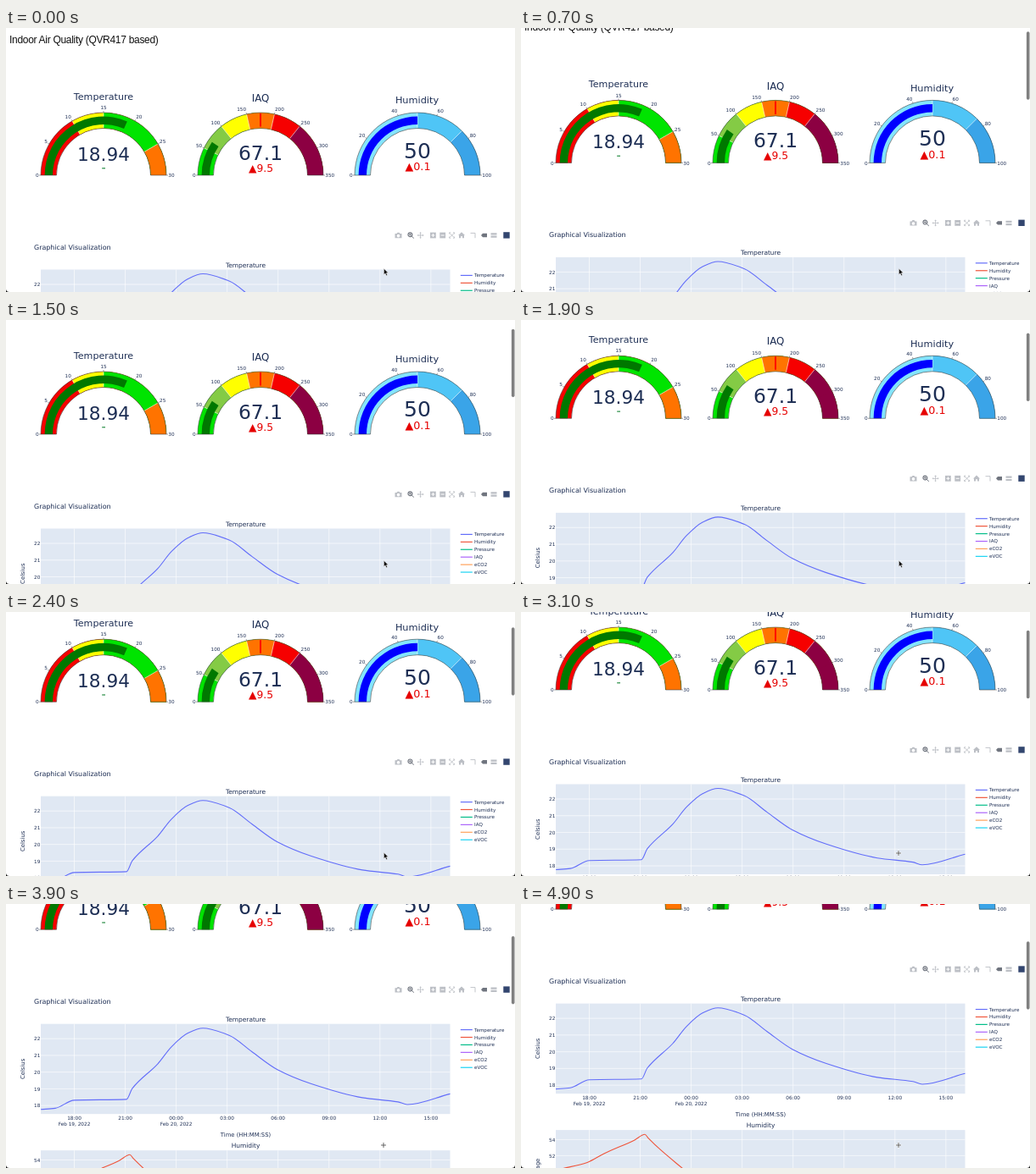
Write an HTML page that moves like this. It is 600 by 312 pixels and loops after 5000 ms.

```html
<!DOCTYPE html>
<html lang="en">
<head>
<meta charset="utf-8">
<title>Air quality dashboard</title>
<style>
html, body { margin: 0; width: 100%; height: 100%; overflow: hidden; background: #fff; }
svg { display: block; width: 600px; height: 312px; }
text { font-family: "DejaVu Sans", sans-serif; fill: #1d2e54; }
.heading { font-family: "Liberation Sans", Arial, sans-serif; fill: #111; letter-spacing: -.3px; }
</style>
</head>
<body>
<svg viewBox="0 0 600 312">
  <g id="page"></g>
  <rect id="thumb" x="595.9" width="3.6" height="80.5" rx="1.8" fill="#808080"/>
  <path id="arrow" d="M445.4 284.3v7.2l1.7-1.5 1.2 2.7 1.3-.6-1.2-2.6h2.3z" fill="#111" stroke="#fff" stroke-width=".5"/>
  <g id="cross">
    <path d="M441.6 285h6.8M445 281.6v6.8" stroke="#fff" stroke-width="1.8"/>
    <path d="M442 285h6M445 282v6" stroke="#444" stroke-width=".8"/>
  </g>
  <path d="M0 308.5Q.3 312 4 312H0zM600 308.5Q599.7 312 596 312H600z" fill="#111"/>
</svg>
<script>
const NS = "http://www.w3.org/2000/svg";
const byId = id => document.getElementById(id);
const page = byId("page");

function add(tag, attrs, parent = page) {
  const el = document.createElementNS(NS, tag);
  for (const key in attrs) el.setAttribute(key, attrs[key]);
  return parent.appendChild(el);
}

function label(str, x, y, size, anchor = "middle", extra = {}) {
  add("text", { x, y, "font-size": size, "text-anchor": anchor, ...extra }).textContent = str;
}

const fill = (d, color, parent) => add("path", { d, fill: color, "fill-rule": "evenodd" }, parent);
const stroke = (d, color, width, parent) =>
  add("path", { d, fill: "none", stroke: color, "stroke-width": width, "stroke-linejoin": "round" }, parent);

// Gauges: half rings standing on one base line
const BASE = 174, OUTER = 74, INNER = 55.5;

function polar(cx, r, frac) {
  const a = Math.PI * (1 - frac);
  return [cx + r * Math.cos(a), BASE - r * Math.sin(a)];
}

function ring(cx, r0, r1, from, to) {
  return `M${polar(cx, r1, from)}A${r1} ${r1} 0 0 1 ${polar(cx, r1, to)}` +
    `L${polar(cx, r0, to)}A${r0} ${r0} 0 0 0 ${polar(cx, r0, from)}Z`;
}

const spoke = (cx, r0, r1, frac) => `M${polar(cx, r0, frac)}L${polar(cx, r1, frac)}`;

// Each colour covers one band of equal width; a repeated colour widens its band.
function gauge({ cx, max, tick, colors, value, bar, mark }) {
  const n = colors.length;
  colors.forEach((color, i) => fill(ring(cx, INNER, OUTER, i / n, 1), color));
  colors.forEach((color, i) => {
    if (i && color !== colors[i - 1]) stroke(spoke(cx, INNER, OUTER, i / n), "#fff", .6);
  });
  fill(ring(cx, 60, 69.4, 0, value / max), bar);
  stroke(ring(cx, INNER, OUTER, 0, 1), "#444", .6);
  if (mark) stroke(spoke(cx, INNER + 2, OUTER - 1, mark / max), "#f00", 1.9);
  for (let v = 0; v <= max; v += tick) {
    const f = v / max;
    stroke(spoke(cx, OUTER, 76, f), "#444", .5);
    const anchor = f === .5 ? "middle" : f < .5 ? "end" : "start";
    label(v, polar(cx, 76.3, f)[0], polar(cx, 80, f)[1] + 2.2, 5.7, anchor);
  }
}

const RED = "#f60000", YELLOW = "#ffff00", GREEN = "#00e400", ORANGE = "#ff7300";
const MAROON = "#8c0042", CYAN = "#84e4fb";

gauge({
  cx: 115, max: 30, tick: 5, value: 18.94, bar: "#007800",
  colors: [RED, RED, YELLOW, GREEN, GREEN, ORANGE]
});
gauge({
  cx: 300, max: 350, tick: 50, value: 67.1, bar: "#007800", mark: 175,
  colors: [GREEN, "#84cb45", YELLOW, ORANGE, RED, MAROON, MAROON]
});
gauge({
  cx: 485, max: 100, tick: 20, value: 50, bar: "#0000ff",
  colors: [CYAN, CYAN, "#4fc5f6", "#3aa4e8"]
});

label("Indoor Air Quality (QVR417 based)", 4, 18, 12, "start", { class: "heading" });
label("Temperature", 115, 85, 11.1);
label("IAQ", 300, 87.2, 11.8);
label("Humidity", 484.5, 89.4, 11.3);
label("18.94", 115, 157, 21.6);
label("67.1", 300, 155.6, 23.4);
label("50", 485, 153.5, 25);
label("▲9.5", 300.5, 169.8, 12.3, "middle", { style: "fill:#e60000" });
label("▲0.1", 485.5, 168.4, 12.7, "middle", { style: "fill:#e60000" });
stroke("M113.2 165.8h3.8", "#108030", 1.1);

// Toolbar: every icon is drawn around its own centre
const GREY = "#bcbfc5", DARK = "#70757f";
const icon = x => add("g", { transform: `translate(${x} 245)` });

fill("M-4-2h2l1-1.3h2l1 1.3h2v5.2h-8zM0-1.2a1.8 1.8 0 1 0 .01 0z", GREY, icon(462.5));
const zoom = icon(477);
stroke("M1.8-.8a2.4 2.4 0 1 0-4.8 0a2.4 2.4 0 1 0 4.8 0", DARK, 1.2, zoom);
stroke("M1.2 1l2.6 2.5M-1.8-.8h2.4M-.6-2v2.4", DARK, 1, zoom);
const pan = icon(488.6);
for (let turn = 0; turn < 360; turn += 90)
  fill("M-.4 0V-2.4H-1.3L0-4 1.3-2.4H.4V0z", GREY, add("g", { transform: `rotate(${turn})` }, pan));
for (const [x, sign] of [[503.4, "M-2 0h4M0-2v4"], [514.7, "M-2 0h4"]]) {
  const box = icon(x);
  fill("M-3.4-3.4h6.8v6.8h-6.8z", GREY, box);
  stroke(sign, "#fff", 1, box);
}
stroke("M-3-1.6V-3.2H-1.4M3-1.6V-3.2H1.4M-3 1.6V3.2H-1.4M3 1.6V3.2H1.4M-2.4-2.4L2.4 2.4M2.4-2.4L-2.4 2.4", GREY, .9, icon(525.6));
fill("M0-3.7l4 3.8h-1v3.2h-2v-2.3h-2v2.3h-2v-3.2h-1z", GREY, icon(537));
stroke("M-3-2.6h5.5v5.8", GREY, .9, icon(550.5));
fill("M-3.6 0l2-2.2h5v4.4h-5z", DARK, icon(563.6));
fill("M-3.5-2.7h7v2.2h-7zM-3.5 .6h7v2.2h-7z", GREY, icon(575));
fill("M-3.7-3.8h7.4v7.4h-7.4z", "#33466f", icon(590));

// Charts: x in hours after 18:00
const LEFT = 41, RIGHT = 523.5, TICKS = 8;
const hourX = h => 80.5 + h * 20.017;

// Monotone cubic through a few [hour, value] points
function smoothPath(points) {
  const slope = (a, b) => (b[1] - a[1]) / (b[0] - a[0]);
  const tangents = points.map((p, i) => {
    const before = i && slope(points[i - 1], p);
    const after = points[i + 1] && slope(p, points[i + 1]);
    if (!i) return after;
    if (after === undefined) return before;
    return before * after > 0 ? 2 * before * after / (before + after) : 0;
  });
  return points.map(([x, y], i) => {
    if (!i) return `M${x} ${y}`;
    const [px, py] = points[i - 1], third = (x - px) / 3;
    return `C${px + third} ${py + tangents[i - 1] * third} ${x - third} ${y - tangents[i] * third} ${x} ${y}`;
  }).join("");
}

function chart({ title, unit, unitY, top, height, ticks, valueY, points, color }) {
  add("rect", { x: LEFT, y: top, width: RIGHT - LEFT, height, fill: "#e0e8f3" });
  for (let i = 0; i < TICKS; i++) stroke(`M${hourX(i * 3)} ${top}v${height}`, "#fff", .6);
  for (const v of ticks) {
    stroke(`M${LEFT} ${valueY(v)}H${RIGHT}`, "#fff", .6);
    label(v, 40.3, valueY(v) + 2.1, 5.7, "end");
  }
  stroke(smoothPath(points.map(([h, v]) => [hourX(h), valueY(v)])), color, 1.1);
  label(title, 282.5, top - 2.9, 7.45);
  label(unit, 0, 0, 6.9, "middle", { transform: `translate(22 ${unitY}) rotate(-90)` });
}

const BLUE = "#636efa", CORAL = "#ef553b";

label("Graphical Visualization", 33, 261.8, 7.95, "start");
chart({
  title: "Temperature", unit: "Celsius", unitY: 338.7, top: 285.5, height: 106.5,
  ticks: [18, 19, 20, 21, 22], valueY: v => 382 - (v - 18) * 19.75, color: BLUE,
  points: [
    [-1.97, 17.77], [-1.12, 17.84], [0, 18.32], [3.07, 18.37], [3.42, 19.03], [4.92, 20.5],
    [5.72, 21.51], [6.67, 22.32], [7.57, 22.63], [9.12, 22.2], [10.47, 21.21], [11.96, 20.15],
    [13.96, 19.3], [16.96, 18.47], [19.06, 18.22], [19.61, 18.06], [22.13, 18.7]
  ]
});
for (let i = 0; i < TICKS; i++) {
  const hour = String((18 + i * 3) % 24).padStart(2, "0");
  label(hour + ":00", hourX(i * 3), 398.4, 5.8);
}
label("Feb 19, 2022", hourX(0), 406, 5.75);
label("Feb 20, 2022", hourX(6), 406, 5.75);
label("Time (HH:MM:SS)", 282.5, 418.7, 6.8);

chart({
  title: "Humidity", unit: "Percentage", unitY: 488, top: 435, height: 106,
  ticks: [52, 54], valueY: v => 446.3 + (54 - v) * 9.5, color: CORAL,
  points: [
    [-1.62, 50.37], [-.12, 51.16], [.87, 52.26], [2.67, 53.95],
    [3.27, 54.65], [3.47, 54.2], [4.22, 52.68], [5.52, 50.37]
  ]
});

const LEGEND = {
  Temperature: BLUE, Humidity: CORAL, Pressure: "#00bd88",
  IAQ: "#ab63fa", eCO2: "#ffa15a", eVOC: "#19d3f3"
};
Object.entries(LEGEND).forEach(([name, color], i) => {
  const y = 292.4 + i * 8.93;
  stroke(`M535.8 ${y}h14`, color, 1.2);
  label(name, 552, y + 2, 5.6, "start");
});

// Scroll position over time: [ms, px]
const LOOP = 5000, STEP = 100, HOVER = 2800;
const SCROLL = [[0, 0], [1200, 25], [1900, 57.7], [3100, 82], [4200, 167], [LOOP, 168]];

function scrollAt(t) {
  const i = SCROLL.findIndex(([ms]) => ms > t);
  const [t0, y0] = SCROLL[i - 1], [t1, y1] = SCROLL[i];
  return y0 + (y1 - y0) * (t - t0) / (t1 - t0);
}

const show = (id, on) => byId(id).setAttribute("visibility", on ? "visible" : "hidden");

function draw(ms) {
  const t = Math.floor(ms % LOOP / STEP) * STEP;
  const y = scrollAt(t);
  page.setAttribute("transform", `translate(0 ${-y})`);
  byId("thumb").setAttribute("y", .5 + y * .26);
  show("thumb", t > 0);
  show("arrow", t < HOVER);
  show("cross", t >= HOVER);
}

let start;
function frame(now) {
  start ??= now;
  draw(now - start);
  requestAnimationFrame(frame);
}
draw(0);
requestAnimationFrame(frame);
</script>
</body>
</html>
```
